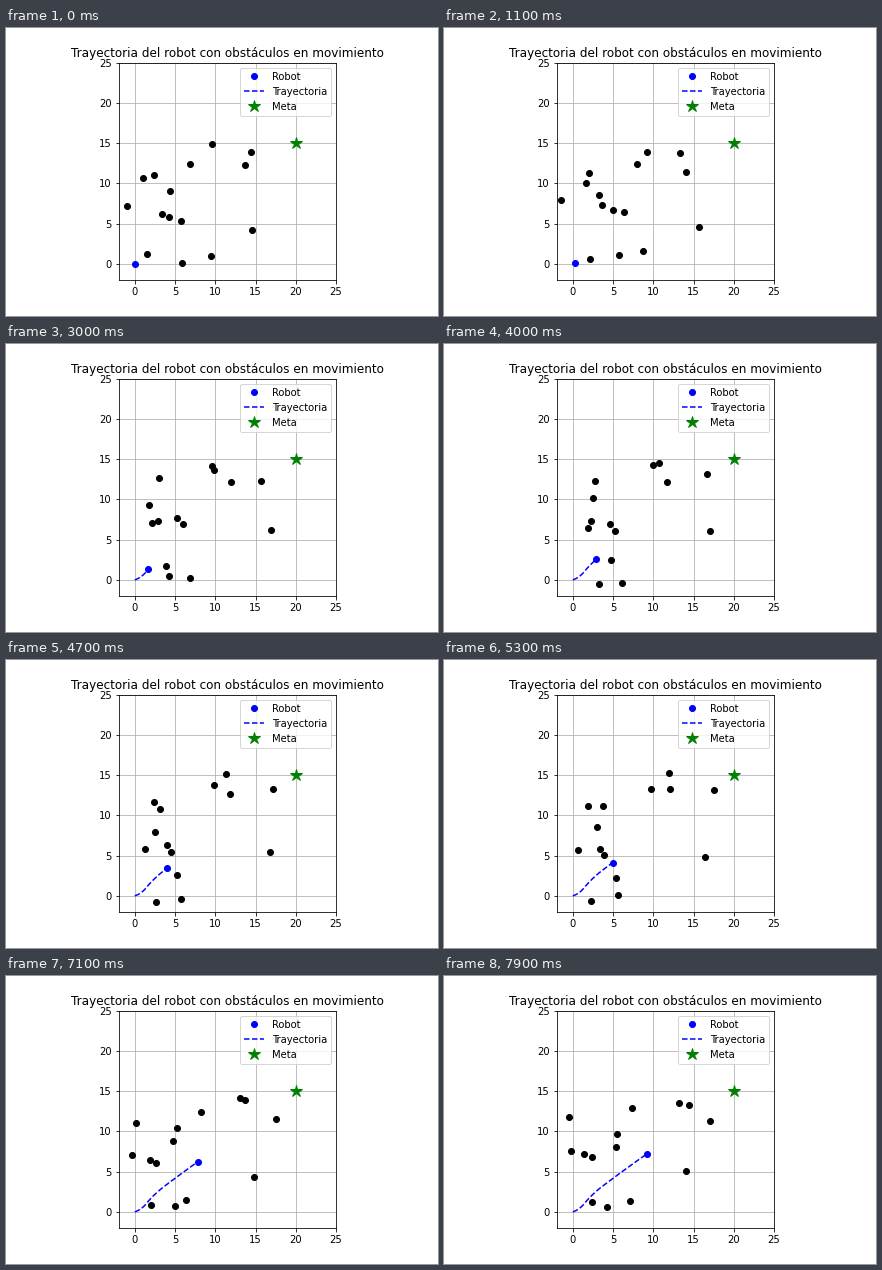
These frames come from a looping animation (432x288 px, 8000 ms). A matplotlib script:

```python
import matplotlib.pyplot as plt
import numpy as np
from matplotlib.animation import FuncAnimation

DT = 0.1
FRAMES = 80
GOAL = (20, 15)
ACCEL, TOP_SPEED = 0.5, 2

# Where each obstacle starts; its index sets the phase of its motion
starts = [
    (1.03, 10.7), (3.38, 6.23), (9.46, 1), (4.37, 9.03), (9.61, 14.92),
    (1.53, 1.26), (14.57, 4.24), (5.77, 5.37), (-0.96, 7.2), (14.45, 13.94),
    (2.38, 11.05), (13.74, 12.28), (6.91, 12.43), (4.24, 5.84), (5.88, 0.15),
]


def walk(start, velocity):
    """Add up velocity steps into one position per frame."""
    first = np.asarray(start, float)[None]
    return np.concatenate([first, first + np.cumsum(velocity * DT, axis=0)])


def obstacle_paths():
    t = np.arange(1, FRAMES)[:, None] * DT
    phase = np.arange(len(starts))
    velocity = np.stack([np.cos(t / 2 + phase), np.sin(t + phase)], axis=-1)
    return walk(starts, velocity)


def robot_path():
    t = np.arange(FRAMES - 1) * DT
    speed = np.minimum(ACCEL * t, TOP_SPEED)
    # Swerve up between the obstacles, then settle towards the goal
    heading = np.radians(np.interp(t, [0, 1.2, 2.7, 4.5, 8],
                                   [20, 24, 51, 37, 35]))
    velocity = speed * np.array([np.cos(heading), np.sin(heading)])
    return walk((0, 0), velocity.T)


crowd = obstacle_paths()
path = robot_path()

fig, ax = plt.subplots(figsize=(6, 4), dpi=72)
fig.subplots_adjust(left=0.125, right=0.9, bottom=0.125, top=0.88)
ax.set(xlim=(-2, 25), ylim=(-2, 25), aspect="equal",
       xticks=range(0, 26, 5), yticks=range(0, 26, 5),
       title="Trayectoria del robot con obstáculos en movimiento")
ax.grid(True)

robot, = ax.plot([], [], "bo", label="Robot")
trail, = ax.plot([], [], "b--", label="Trayectoria")
ax.plot(*GOAL, "g*", markersize=12, label="Meta")
dots, = ax.plot([], [], "ko")
ax.legend(loc="upper right")


def update(i):
    dots.set_data(*crowd[i].T)
    robot.set_data(*path[i:i + 1].T)
    trail.set_data(*path[:i + 1].T)
    return dots, robot, trail


anim = FuncAnimation(fig, update, frames=FRAMES, interval=100,
                     repeat=True, repeat_delay=0)
plt.show()
```
